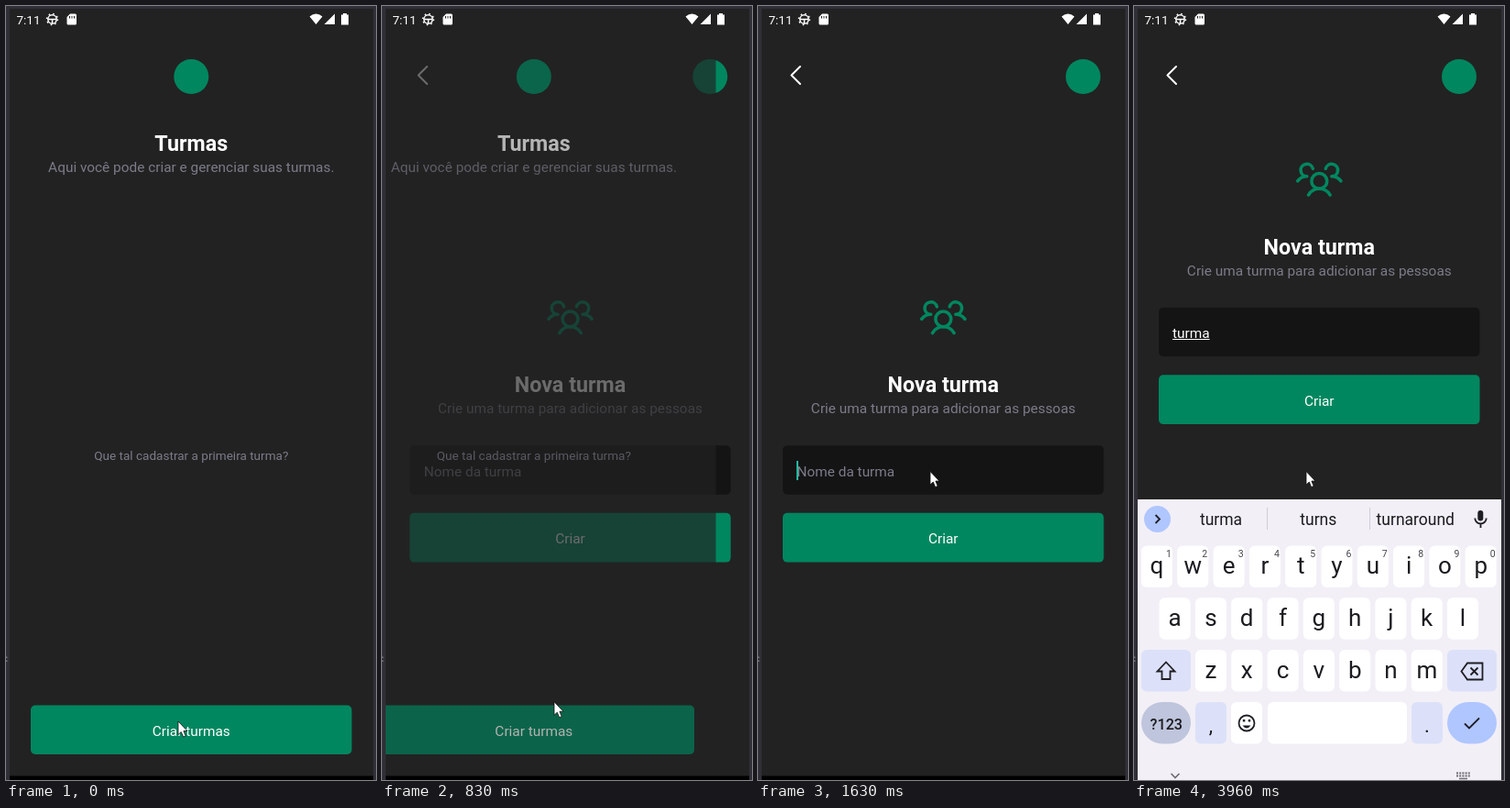
These frames come from a looping animation (404 px wide and 844 px high, 8000 ms). An HTML page:

```html
<!DOCTYPE html>
<html lang="pt-BR">
<head>
<meta charset="utf-8">
<title>Turmas</title>
<style>
  html, body { margin: 0; width: 404px; height: 844px; overflow: hidden; background: #222; }
  svg { display: block; }
  text { font: 15.4px Roboto, sans-serif; fill: #fff; white-space: pre; }
  .mid text { text-anchor: middle; }
  text.h { font-size: 23.3px; font-weight: 700; }
  text.sub { fill: #7c7c8a; }
  text.small { font-size: 13.55px; fill: #7c7c8a; }
  .green { fill: #00875f; }
  .line { fill: none; stroke-linecap: round; stroke-linejoin: round; }
  #keyboard text { fill: #1c1b20; text-anchor: middle; }
  #keyboard text.key { font-size: 26px; }
  #keyboard text.hint { font-size: 10.5px; fill: #46454d; }
  #keyboard text.word { font-size: 17.5px; }
  .ink { stroke: #1f1e24; stroke-width: 1.8; fill: none; }
  .dark { fill: #1f1e24; }
</style>
</head>
<body>
<svg width="404" height="844" viewBox="0 0 404 844">
  <rect width="404" height="844" fill="#222"/>

  <g id="next">
    <path class="line" d="M46 66 36.500 75.500 46 85" stroke="#fff" stroke-width="2"/>
    <circle class="green" cx="355" cy="77" r="19"/>
    <g id="form" class="mid">
      <g class="line" stroke="#00875f" stroke-width="17" transform="translate(175.300 311) scale(.211)">
        <circle cx="128" cy="144" r="40"/>
        <path d="M72 216a65 65 0 0 1 112 0"/>
        <path id="side" d="M16 144a60 60 0 0 1 48-24a32 32 0 1 1 31-40"/>
        <use href="#side" transform="matrix(-1 0 0 1 256 0)"/>
      </g>
      <text class="h" x="202.300" y="421">Nova turma</text>
      <text class="sub" x="202.300" y="444">Crie uma turma para adicionar as pessoas</text>
      <rect x="27" y="479.200" width="350.500" height="53.500" rx="5" fill="#141415"/>
      <text id="hint" class="sub" x="42.500" y="512.500" style="text-anchor:start">Nome da turma</text>
      <text id="typed" x="42" y="512.500" style="text-anchor:start"></text>
      <rect id="under" x="42" y="513.500" height="1" fill="#fff"/>
      <rect id="caret" y="496" width="2" height="21" fill="#24b8a0"/>
      <rect class="green" x="27" y="552.800" width="350.500" height="53.800" rx="5"/>
      <text x="202.300" y="586">Criar</text>
    </g>
  </g>

  <g id="home" class="mid">
    <rect x="4" y="3" width="397" height="841" fill="#222"/>
    <circle class="green" cx="202.300" cy="77" r="19"/>
    <text class="h" x="202.300" y="157.500">Turmas</text>
    <text class="sub" x="202.300" y="180.500">Aqui você pode criar e gerenciar suas turmas.</text>
    <text class="small" x="202.300" y="494.500">Que tal cadastrar a primeira turma?</text>
    <g id="create">
      <rect class="green" x="27" y="762.500" width="350.500" height="53.500" rx="5"/>
      <text x="202.300" y="795.500">Criar turmas</text>
    </g>
  </g>

  <rect x="4" y="839.500" width="397" height="5"/>

  <g id="keyboard">
    <rect x="4" y="538" width="397" height="306" fill="#f2eff7"/>
    <g id="keys"></g>
    <g id="upper"><path class="dark" d="M35 714 46 726H40.500V735H29.500V726H24Z"/></g>
    <g id="lower"><path class="ink" d="M35 715.500 44.500 725.500H39.500V734H30.500V725.500H25.500Z"/></g>

    <path class="ink" d="M357.500 725.500 364 716.500H380.500V734.500H364ZM367.500 721.500l8 8m0-8-8 8"/>
    <text x="35.300" y="788.500" style="font-size:16.200px;font-weight:500">?123</text>
    <text x="84" y="792" style="font-size:22px">,</text>
    <text x="320" y="792" style="font-size:22px">.</text>
    <circle class="ink" cx="123" cy="782" r="8.500"/>
    <path class="dark" d="M118.500 784.500H127.500Q123 790.500 118.500 784.500M118.800 778h2.500v2.500h-2.500zM124.700 778h2.500v2.500h-2.500z"/>
    <path class="ink" d="M361 782.500 366 787.500 377 776.500"/>

    <circle cx="25.500" cy="559.500" r="14.500" fill="#b0c6ff"/>
    <g id="tools">
      <path class="ink" d="M27.500 555 23 559.500 27.500 564"/>
      <path class="ink" d="M75 552H90V561L84 567H75ZM84 567V561H90M78 561q3 4 5 1"/>
      <path class="dark" d="M77.500 555.500h3v3h-3zM84.500 555.500h3v3h-3z"/>
      <text x="139" y="564" style="font-size:13px;font-weight:900;letter-spacing:.8px">GIF</text>
      <path class="ink" d="M188.500 552.500H202.500V568H188.500ZM191.500 558.500h8m-8 3h8m-8 3h5"/>
      <path class="dark" d="M191.500 550.500h8v4.500h-8z"/>
      <circle class="ink" cx="252" cy="559.500" r="4.800" style="stroke-width:4"/>
      <circle class="ink" cx="252" cy="559.500" r="7.500" stroke-dasharray="3.930" style="stroke-width:2.500"/>
      <path d="M287 549v21" stroke="#cfccd6"/>
      <path class="dark" d="M314 557.500h3.500v3.500h-3.500zM319.500 557.500h3.500v3.500h-3.500zM325 557.500h3.500v3.500h-3.500z"/>
    </g>
    <g id="words">
      <path class="ink" d="M23.500 555 28 559.500 23.500 564"/>
      <path d="M145.500 547v24M257.500 547v24" stroke="#cfccd6"/>
      <text class="word" x="95" y="566">turma</text>
      <text class="word" x="201.300" y="566">turns</text>
      <text class="word" x="307.300" y="566">turnaround</text>
    </g>
    <rect class="dark" x="375.300" y="550" width="6" height="11.500" rx="3"/>
    <path class="ink" d="M372.300 558.500a6.200 6 0 0 0 12.400 0M378.500 564.500V569"/>

    <g id="nav" stroke="#6f6d75" fill="none">
      <path d="M40.500 837 45 841.500 49.500 837" stroke-width="1.700"/>
      <path d="M352 836.500h15M352 839.500h15" stroke-width="2" stroke-dasharray="2 1.200"/>
      <path d="M355 842.500h9" stroke-width="1.500"/>
    </g>
  </g>

  <g id="status" fill="#fff">
    <text x="11.500" y="20" style="font-size:13.500px">7:11</text>
    <circle class="line" cx="50.500" cy="14.500" r="4.700" stroke="#fff" stroke-width="1.500"/>
    <circle class="line" cx="50.500" cy="14.500" r="6" stroke="#fff" stroke-width="1.500" stroke-dasharray="1.600 3.110" style="stroke-linecap:butt"/>
    <path d="M46 13.800h9v1.500h-9zM49.800 15h1.500v4h-1.500z"/>
    <path d="M70 8.500H75.500Q77 8.500 77 10V19Q77 20.500 75.500 20.500H68Q66.500 20.500 66.500 19V12Z"/>
    <path d="M69.500 11v2.500M72 11v2.500M74.500 11v2.500" stroke="#222"/>
    <path d="M331.500 11.500Q338.500 5.500 345.500 11.500L338.500 20ZM359 8.500V20H347.500ZM368 9.500V8h4V9.500H374V20.500H366V9.500Z"/>
  </g>

  <path d="M0 0H404V844H401V3H4V844H0Z" fill="#302f38"/>
  <path d="M0 709.500h1.500v1.500H0zM0 713.500h1.500v1.500H0z" fill="#77767e"/>
  <path id="pointer" d="M0 0V14.500L3.300 11.500 5.600 17 8.200 16 5.900 10.500H10Z" fill="#fff" stroke="#111" stroke-width=".8"/>
</svg>
<script>
const $ = id => document.getElementById(id);
const show = (id, on) => $(id).style.display = on ? '' : 'none';
const clamp = x => Math.max(0, Math.min(1, x));

function add(parent, tag, attrs, text = '') {
  const el = document.createElementNS('http://www.w3.org/2000/svg', tag);
  for (const k in attrs) el.setAttribute(k, attrs[k]);
  el.textContent = text;
  $(parent).append(el);
}
const key = (x, y, width = 34, fill = '#fff', rx = 6) =>
  add('keys', 'rect', { x, y, width, height: 45.5, rx, fill });

[['QWERTYUIOP', 8], ['ASDFGHJKL', 27.6], ['ZXCVBNM', 67]].forEach(([row, left], r) => {
  const y = 588.5 + 56.8 * r;
  [...row].forEach((c, i) => {
    const x = left + 39.3 * i, mid = x + 17;
    key(x, y);
    add('upper', 'text', { class: 'key', x: mid, y: y + 33.5 }, c);
    add('lower', 'text', { class: 'key', x: mid, y: y + 30.5 }, c.toLowerCase());
    if (!r) add('keys', 'text', { class: 'hint', x: mid + 13, y: 600.5 }, (i + 1) % 10);
  });
});
const tint = '#dce1f9';
key(8, 702, 54, tint);
key(342, 702, 54, tint);
key(8, 759, 54, '#bfc5dc', 23);
key(67, 759, 34, tint);
key(106, 759);
key(146, 759, 152);
key(303, 759, 34, tint);
key(342, 759, 54, '#b0c6ff', 23);

// Two-part easing: quick start, very slow finish
const bez = (p, u) => {
  const v = 1 - u;
  return p[0] * v ** 3 + 3 * p[1] * v * v * u + 3 * p[2] * v * u * u + p[3] * u ** 3;
};
function ease(x) {
  x = clamp(x);
  const [px, py] = x < 1 / 6
    ? [[0, .05, .1333, 1 / 6], [0, 0, .06, .4]]
    : [[1 / 6, .2083, .25, 1], [.4, .82, 1, 1]];
  let lo = 0, hi = 1;
  for (let i = 0; i < 25; i++) {
    const m = (lo + hi) / 2;
    if (bez(px, m) < x) lo = m; else hi = m;
  }
  return bez(py, lo);
}
const inOut = x => x < .5 ? 2 * x * x : 1 - 2 * (1 - x) ** 2;

const trail = [[0, 780], [630, 780], [750, 766.5], [920, 751], [1080, 608]];
function pointerY(t) {
  if (t >= 1420) return 507.5;
  const i = trail.findIndex(p => p[0] > t);
  if (i < 0) return 608;
  const [a, b] = [trail[i - 1], trail[i]];
  return a[1] + (b[1] - a[1]) * (t - a[0]) / (b[0] - a[0]);
}

const slide = 39.7;
function draw(t) {
  const moving = t >= 630 && t < 1080, done = t >= 1080;
  const q = moving ? 630 + 41 * Math.floor((t - 622) / 41) : t;

  const p = done ? 1 : moving ? ease((q - 606) / 555) : 0;
  show('home', !done);
  $('home').setAttribute('transform', `translate(${-slide * p})`);
  $('home').setAttribute('opacity', clamp(1 - (q - 705) / 390));
  $('next').setAttribute('transform', `translate(${slide * (1 - p)})`);
  $('next').setAttribute('opacity', done ? 1 : clamp((q - 640) / 133));
  $('create').setAttribute('opacity', t < 290 ? 1 : .2 + .8 * inOut(clamp((q - 630) / 230)));

  const typing = t >= 2830, lower = t >= 3130, full = t >= 3960;
  $('form').setAttribute('transform', `translate(0 ${typing ? -150.5 : 0})`);
  show('keyboard', typing);
  show('upper', !lower);
  show('lower', lower);
  show('tools', !full);
  show('words', full);
  $('nav').setAttribute('opacity', full ? 1 : lower ? .7 : .3);

  const text = full ? 'turma' : lower ? 'tu' : typing ? 't' : '';
  if ($('typed').textContent !== text) $('typed').textContent = text;
  const width = text ? $('typed').getComputedTextLength() : 0;
  show('hint', !text);
  show('under', lower);
  $('under').setAttribute('width', width);
  show('caret', t >= 1630 && !full);
  $('caret').setAttribute('x', 42 + width);

  $('pointer').setAttribute('transform', `translate(188 ${pointerY(q)})`);
}
function frame() {
  draw(performance.now() % 8000);
  requestAnimationFrame(frame);
}
frame();
</script>
</body>
</html>
```
